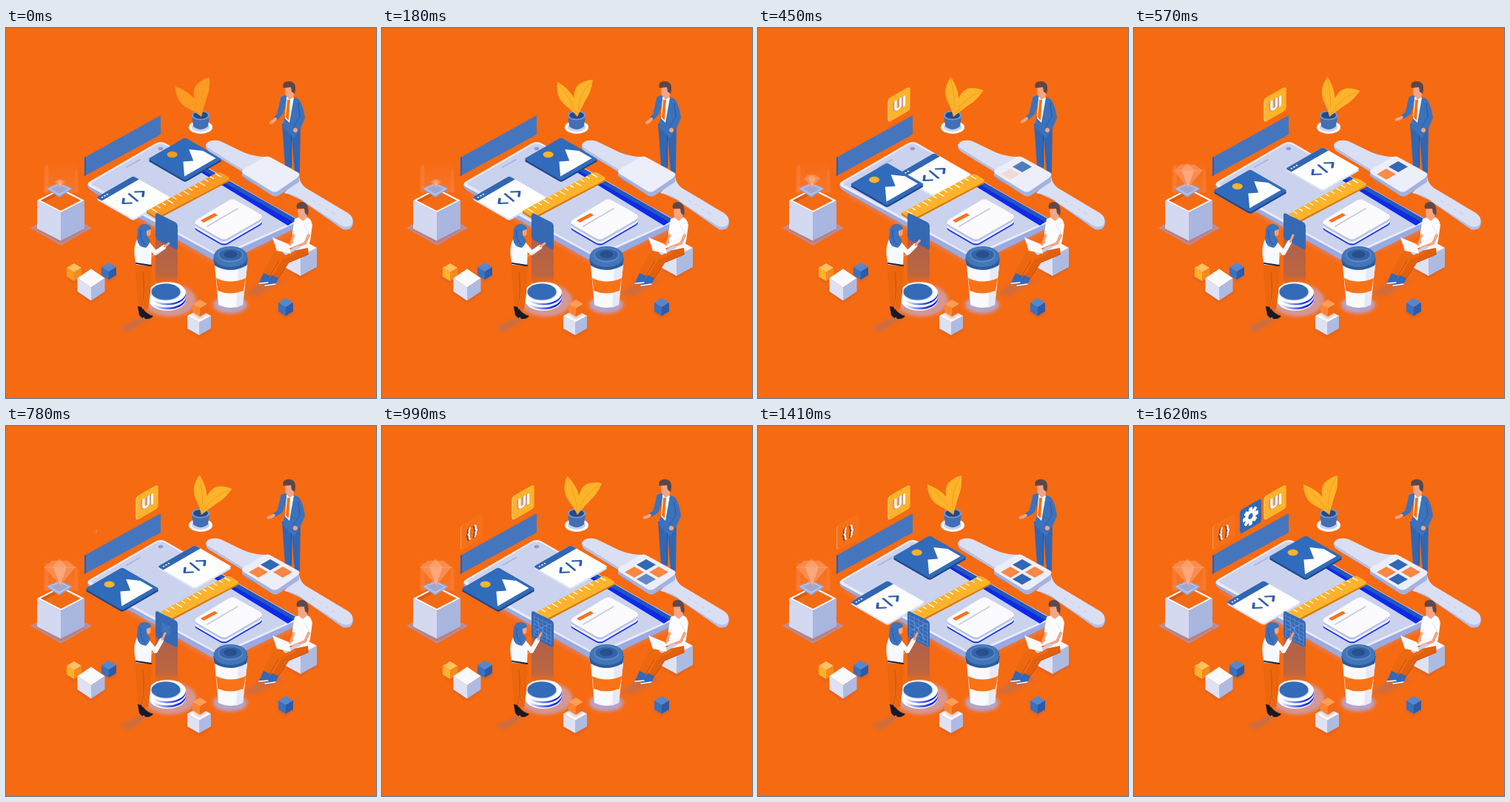
An HTML page that plays this animation: 500x500 px, repeating every 1830 ms.

```html
<!DOCTYPE html>
<html lang="en">
<head>
<meta charset="utf-8">
<title>Isometric design workspace</title>
<style>
html, body { margin: 0; height: 100%; overflow: hidden; background: #f66a12 }
svg { display: block; width: 100vw; height: 100vh }
.y { fill: var(--yellow) }
text { font-family: Roboto, sans-serif; font-weight: 900; text-anchor: middle }
</style>
</head>
<body>
<svg id="stage" viewBox="0 0 500 500"></svg>
<script>
const svg = document.getElementById('stage');
const $ = id => document.getElementById(id);

const poly = (fill, points, more = '') => `<polygon fill="${fill}" points="${points}" ${more}/>`;
const path = (fill, d, more = '') => `<path fill="${fill}" d="${d}" ${more}/>`;
const line = (stroke, width, d, more = '') =>
  `<path fill="none" stroke="${stroke}" stroke-width="${width}" stroke-linecap="round" stroke-linejoin="round" d="${d}" ${more}/>`;
const oval = (fill, cx, cy, rx, ry, more = '') =>
  `<ellipse fill="${fill}" cx="${cx}" cy="${cy}" rx="${rx}" ry="${ry}" ${more}/>`;
const group = (id, body, more = '') => `<g id="${id}" ${more}>${body}</g>`;
const repeat = (n, draw) => Array.from({ length: n }, (_, i) => draw(i)).join('');

const WHITE = ['#fbfbff', '#dfe2f3', '#adbbe2'];
const BLUE = ['#5288cf', '#3b70bb', '#2b5aa8'];
const ORANGE = ['#ff9c55', '#fb8531', '#ef6a18'];
const YELLOW = ['#ffc062', 'var(--yellow)', '#f48a1d'];
const SKIN = '#f3a585';
const FLOOR = 'matrix(.866 -.5 .866 .5 0 0)';
const WALL = 'matrix(.866 -.5 0 1 0 0)';
const BLUR = 'filter="url(#blur)"';

// x, y is the middle of the top face; w, d its half diagonals
function cube(x, y, w, d, h, [top, left, right]) {
  return poly('#b2593c', [x - w - 2, y + h, x, y + h - d, x + w + 2, y + h, x, y + h + d + 3], 'opacity=".45" ' + BLUR) +
    poly(top, [x - w, y, x, y - d, x + w, y, x, y + d]) +
    `<polygon style="fill:${left}" points="${[x - w, y, x, y + d, x, y + d + h, x - w, y + h]}"/>` +
    poly(right, [x + w, y, x, y + d, x, y + d + h, x + w, y + h]);
}

function floorCard(id, face, edge, art) {
  const rect = fill => `<rect x="-29" y="-29" width="58" height="58" rx="3" fill="${fill}"/>`;
  return group(id, `<g transform="translate(0 2.5)"><g transform="${FLOOR}">${rect(edge)}</g></g>
    <g transform="${FLOOR}">${rect(face)}${art}</g>`);
}

function wallIcon(id, face, edge, art) {
  const rect = (x, fill) => `<rect x="${x}" y="-16" width="33.500" height="32" rx="4" style="fill:${fill}"/>`;
  return group(id, `<g transform="${WALL}">${rect(-18, edge)}${rect(-16.5, face)}${art}</g>`);
}

const label = (s, size, shade) =>
  `<text x="-1.500" y="6.500" font-size="${size}" fill="${shade}">${s}</text><text x="1" y="6.500" font-size="${size}" fill="#fff">${s}</text>`;

const gear = repeat(8, i => `<rect x="-2.7" y="-12" width="5.4" height="8" rx="1" transform="rotate(${i * 45})" fill="#fff"/>`) +
  '<circle r="6.2" fill="none" stroke="#fff" stroke-width="5"/>';

const board = poly('#4576bd', '106,175 209,118 209,144 106,200') +
  poly('#315ea9', '106,175 108,174 108,199 106,200');

const leaf = (d, vein) => path('', d, 'class="y"') + line('#f99a1c', .8, vein);
const plant = oval('#fff', 263, 134, 16, 9) + oval('#c9d2ec', 263, 134, 12, 6) +
  path('#426fb5', 'M251 118L253 133Q263 141 273 133L275 118Z') +
  oval('#7598cf', 263, 118, 12.5, 6.5) + oval('#274a86', 263, 118, 10, 4.8) +
  group('leaves',
    leaf('M264 120Q262 91 229 79Q229 99 245 108Q257 114 264 120Z', 'M263 118Q252 98 231 82') +
    leaf('M264 120Q247 88 258 76Q266 69 275 67Q276 84 271 95Q267 108 264 120Z', 'M264 116Q259 92 273 70'));

const phone = path('#d98674', 'M112 222L285 321L395 274L300 240Z', 'opacity=".6" ' + BLUR) +
  path('#9aabe3', 'M110 211Q110 217 116 220L279 313Q290 320 302 314L390 271Q396 267 395 258L212 160Z') +
  path('#e9ecf9', 'M114 207L202 156Q209 152 216 156L390 257Q395 261 390 264L298 306Q288 310 280 305L114 215Q107 211 114 207Z') +
  path('#cbd2ed', 'M117 208L203 158Q209 155 215 158L388 258Q392 261 387 263L297 303Q288 307 281 303L118 213Q113 211 117 208Z') +
  poly('#0b2be6', '247,185 255,180 393,259 381,267') +
  poly('#2456bd', '249,183 255,180 393,259 388,262') +
  line('#aab5dd', 2, 'M163 188L181 178') + oval('#8e9cce', 209, 163, 3.3, 2.2);

const codeCard = floorCard('code', '#fff', '#dbe0f2',
  '<path fill="#3166b2" d="M-29 -20V-26Q-29 -29 -26 -29H26Q29 -29 29 -26V-20Z"/>' +
  repeat(3, i => `<circle cx="${-24 + i * 4}" cy="-24.5" r="1.2" fill="#fff"/>`) +
  line('#2d5ca9', 2.8, 'M-9 -6L-16 0L-9 6M9 -6L16 0L9 6M1.5 -8L-1.5 8'));
const imageCard = floorCard('image', '#316bbb', '#1e478c',
  '<circle class="y" cx="-4" cy="-16" r="5.8"/>' +
  poly('#fff', '-24,23 -5,2 4,9 16,-10 25,3 25,23'));

const ruler = group('ruler',
  poly('#d9780e', '190,247 190,250 204,259 302,207 302,204 204,256') +
  path('', 'M190 247L284 196Q288 194 292 196L300 201Q304 203 300 206L204 256Z', 'class="y"') +
  repeat(13, i => {
    const n = i % 3 ? 4 : 7;
    return line('#fff', 1.3, `M${197 + i * 7.2} ${244.5 - i * 3.95}l${n} ${n * .57}`);
  }));

const slab = 'M258 259L301 233Q306 230 311 233L343 251Q349 255 343 259L300 284Q295 287 289 284L258 266Q253 263 258 259Z';
const note = [['#1533ea', 8], ['#f2f4fd', 6], ['#b9c3e7', 3], ['#fbfbff', 0]]
  .map(([fill, dy]) => path(fill, slab, `transform="translate(0 ${dy})"`)).join('') +
  poly('#f9711c', '263,260 282,250 286,253 267,263') +
  line('#c3c9e4', 1.5, 'M272 268L313 244');

const tile = (id, x, y, fill) => group(id, poly(fill, [x - 13, y, x, y - 7.5, x + 13, y, x, y + 7.5]));
const watch = path('#b4c0e6', 'M270 157Q269 164 276 168L322 196L345 181L287 154Z') +
  path('#dadff3', 'M273 154Q280 150 290 153L321 168Q336 174 352 174L321 192L276 164Q267 159 273 154Z') +
  path('#b4c0e6', 'M376 222L398 232L455 272Q469 275 469 261L398 212Z') +
  path('#dadff3', 'M396 201Q398 211 405 216L462 250Q472 257 467 266Q461 271 453 267L406 237Q393 225 376 223Z') +
  repeat(4, i => line('#c0c9e8', 1, `M${414 + i * 9} ${233 + i * 5.4}l3 2`)) +
  path('#a4b2df', 'M319 194V200L359 226Q364 229 369 226L396 208V199Z') +
  path('#eceffa', 'M321 191L348 175Q353 172 358 175L394 195Q399 198 394 202L368 220Q363 223 358 220L321 197Q317 194 321 191Z') +
  line('#8997cc', 1.5, 'M324 204l10 6') +
  tile('tileTop', 357, 187.5, '#3267b6') + tile('tileLeft', 341, 197.5, '#fb8542') +
  tile('tileRight', 374, 197.5, '#fb8542') + tile('tileBottom', 357, 207, '#3267b6');

const standingMan =
  path('#3366b1', 'M373 129L398 130L397 196L390 194L386 150L385 189L377 186Z') +
  line('#264f94', 1, 'M385.500 136V188') +
  path('#3c72bb', 'M373 92L381 91L391 94Q400 95 404 121Q401 130 396 139L389 149L374 133L378 114Z') +
  poly('#fff', '379,93 389,94 383,128 377,122') + poly('#f97312', '380,97 384,97 382,125 378,121') +
  line('#3c72bb', 8, 'M375 96L371 113') + group('manArm', line('#3c72bb', 6, 'M371 115L366 121') + line(SKIN, 4, 'M364 123L361 126L358 128')) +
  line('#2b579f', 1, 'M395 102L397 120L389 133') + oval(SKIN, 391, 138, 3, 3) +
  path(SKIN, 'M377 80L389 79L389 93L383 97L377 89Z') +
  path('#5b4649', 'M375 81Q372 72 383 72Q394 73 390 89L386 86L385 80Z');

const leftBox = poly('#b495b2', '33,270 74,248 116,270 74,294', 'opacity=".85"') +
  cube(74, 233, 32, 16.5, 38, ['#f5f6fd', '#d3d9f0', '#a8b6e0']) +
  poly('#f36b12', '47,233 74,219 101,233 74,247') + poly('#d95a16', '47,233 74,219 74,223 52,235') +
  '<rect x="51" y="178" width="47" height="44" fill="url(#beam)"/>' +
  line('#fb8c50', 5, 'M55 187V221', 'opacity=".35"') + line('#fb8c50', 3, 'M95 192V222', 'opacity=".3"') +
  poly('#8fa2d6', '54,217 72,209 90,217 72,229') + poly('#b4c0e5', '56,217 72,210 88,217 72,227') +
  poly('#9fa8d3', '60,217 72,212 84,217 72,224') +
  group('gem', poly('#fb8f58', '52,191 62,182 83,182 94,191 73,216') + poly('#fca878', '62,191 72,180 83,191') +
    poly('#fdb28c', '64,191 82,191 73,216') + line('#fcb28a', .8, 'M52 191H94'), 'opacity=".85"');

const disc = oval('#cba3b8', 221, 368, 36, 22, BLUR + ' opacity=".8"') +
  [['#fff', 367.5], ['url(#ring)', 366], ['#fff', 363], ['url(#ring)', 360], ['#fff', 357.5]]
    .map(([fill, y]) => oval(fill, 218, y, 25, 14.5)).join('') +
  oval('#d8def3', 216, 357, 21, 12) + oval('#336bb8', 216, 356.5, 19.5, 11);

const screen = '<rect x="202" y="284" width="30" height="62" fill="url(#shade)"/>' +
  path('#3569b4', 'M202 253Q202 249 206 251L228 262Q232 264 232 268V296Q232 300 228 298L206 287Q202 285 202 281Z') +
  group('mesh', repeat(5, i => line('#6f9ad8', .6, `M${205 + i * 6} ${254 + i * 3}v30`)) +
    repeat(6, i => line('#6f9ad8', .6, `M204 ${256 + i * 5.4}l26 13`)) +
    line('#84abe2', .6, 'M206 277L227 267M208 262L226 289'));

const woman = poly('#b8705a', '152,406 184,390 194,392 165,411', 'opacity=".7" ' + BLUR) +
  path('#ec660d', 'M175 318L196 320Q198 345 192 380L186 380L185 350L184 378L179 377Q175 345 175 318Z') +
  line('#ce520d', 1, 'M185 330Q188 350 184 376') +
  path('#151a2b', 'M178 376L183 377L189 389L184 392L180 388Z') + path('#151a2b', 'M185 379Q190 387 199 389Q196 394 188 393L185 388Z') +
  path('#f8f9ff', 'M178 284Q170 297 176 320L196 321L197 298L191 286Z') + line('#1c2240', 2, 'M176 318L196 321') +
  group('womanArm', '') +
  path(SKIN, 'M188 268L196 271L195 280L189 282Z') +
  path('#3d73bb', 'M178 273Q180 264 189 265Q197 267 196 272L190 274Q189 281 194 285Q196 291 189 297Q178 296 177 285Z') +
  line('#28569f', 1, 'M182 273Q180 285 188 293');

const cup = oval('#b8a3c7', 303, 374, 23, 12, BLUR) +
  path('#f9f9fe', 'M282 320L287 374Q303 382 320 374L326 320Z') + path('#e6e9f5', 'M314 325L311 378L320 374L326 320Z') +
  path('#f97316', 'M284 338Q303 347 324 338L321 355Q303 362 286 355Z') +
  path('#2d5b9d', 'M280 311L282 321Q303 333 325 321L327 311Z') +
  oval('#4376b8', 303.5, 309, 23, 14) + oval('#5f8bc4', 303.5, 307, 17, 9.5) +
  oval('#3465a8', 303.5, 306.5, 15.5, 8) + oval('#274f8c', 303.5, 306, 9, 5);

const sittingMan = poly('#b8705a', '323,361 352,334 376,342 340,362', 'opacity=".6" ' + BLUR) +
  cube(398, 297, 22, 12, 26, WHITE) +
  path('#e2600c', 'M408 297L384 302Q377 304 374 311L359 337L366 341L382 317L409 306Z') +
  path('#ec680f', 'M392 295L367 302Q360 304 357 311L347 333L355 337L369 315L392 306Z') +
  line('#c9500f', 1, 'M355 337L369 315M366 341L382 317L408 306') +
  path('#3568b5', 'M348 331L357 335L355 342Q349 347 342 344Z') + path('#3568b5', 'M359 334L368 338L365 345Q357 350 350 347Z') +
  line('#fff', 1.3, 'M342 345L354 344M350 348L364 346') +
  path('#fdfdff', 'M390 258L401 254Q412 255 414 266L411 288L408 297L388 294L387 276Z') +
  line('#d8ddef', 1, 'M403 266L409 276L406 292') +
  line(SKIN, 4, 'M409 280L404 291L389 297') + line(SKIN, 3, 'M389 280L384 293') +
  poly('#c9d1eb', '374,304 395,294 398,297 378,307') + poly('#f8f9ff', '360,283 382,292 385,305 366,301') +
  path(SKIN, 'M394 245L406 244L407 256L401 261L395 256Z') +
  path('#5e4a4d', 'M393 244Q391 235 401 235Q411 238 408 254L404 250L403 244Z');

const gradient = (id, attrs, stops) => `<linearGradient id="${id}" ${attrs}>` +
  stops.map(([at, color, alpha = 1]) => `<stop offset="${at}" stop-color="${color}" stop-opacity="${alpha}"/>`).join('') + '</linearGradient>';

svg.innerHTML = `<defs>
  <filter id="blur" x="-40%" y="-40%" width="180%" height="180%"><feGaussianBlur stdDeviation="2"/></filter>` +
  gradient('beam', 'x2="0" y2="1"', [[0, '#fb8c50', 0], [1, '#fb8c50', .35]]) +
  gradient('shade', 'x2="0" y2="1"', [[0, '#b0614c'], [.8, '#bb663f'], [1, '#bb663f', 0]]) +
  gradient('ring', '', [[.1, '#fff'], [.55, '#5068ee'], [.8, '#122de6']]) +
  '</defs><rect width="500" height="500" fill="#f66a12"/>' +
  board +
  wallIcon('braces', '#f57118', '#fb9450', label('{ }', 18, '#7d4230')) +
  wallIcon('gear', '#3268b5', '#5b8bcd', gear) +
  wallIcon('ui', 'var(--yellow)', '#ffcb6c', label('UI', 20, '#c99a86')) +
  plant + phone + codeCard + imageCard + ruler + note + standingMan + watch + leftBox +
  cube(92, 324, 10, 6, 12, YELLOW) + cube(139, 323, 10, 6, 11, BLUE) + cube(115, 338, 18.5, 12.5, 18, WHITE) +
  disc + screen + woman + cup + sittingMan +
  cube(261, 389, 16, 9, 17, WHITE) + cube(262, 373, 10, 6, 11, ORANGE) +
  cube(378, 371, 10, 6, 12, BLUE);

const clamp = x => Math.max(0, Math.min(1, x));
const span = (t, a, b) => clamp((t - a) / (b - a));
const sine = x => (1 - Math.cos(Math.PI * x)) / 2;
const cubic = x => x < .5 ? 4 * x ** 3 : 1 - 4 * (1 - x) ** 3;
const easeOut = x => 1 - (1 - x) ** 2;
const mix = (a, b, p) => a + (b - a) * p;

const move = (id, transform) => $(id).setAttribute('transform', transform);
const place = (id, from, to, p) => move(id, `translate(${mix(from[0], to[0], p)} ${mix(from[1], to[1], p)})`);
const grow = (id, x, y, s) => move(id, `translate(${x} ${y}) scale(${s})`);
const growAbout = (id, x, y, s) => move(id, `translate(${x} ${y}) scale(${s}) translate(${-x} ${-y})`);
const fade = (id, p) => $(id).setAttribute('opacity', p);

function render(t) {
  svg.style.setProperty('--yellow', t < 60 ? '#fd9a22' : '#fdb32a');

  const sway = sine(span(t, 0, 500)) - sine(span(t, 800, 1300));
  move('leaves', `rotate(${38 * sway} 264 120)`);

  const out = cubic(span(t, 230, 580)), back = cubic(span(t, 980, 1340));
  if (t < 900) {
    place('image', [242, 177], [157, 220], out);
    place('code', [172, 229], [255, 190], out);
  } else {
    place('image', [157, 220], [232, 177], back);
    place('code', [255, 190], [175, 238], back);
  }
  const reach = sine(span(t, 380, 560));
  place('ruler', [0, 0], [12, 8], reach);

  grow('ui', 191, 103, easeOut(span(t, 180, 420)));
  grow('braces', 121.5, 143, easeOut(span(t, 765, 1000)));
  grow('gear', 157.5, 122, easeOut(span(t, 1410, 1620)));
  growAbout('gem', 73, 216, mix(.32, 1, sine(span(t, 350, 630))));

  fade('tileTop', span(t, 280, 480));
  fade('tileLeft', span(t, 420, 580));
  fade('tileRight', span(t, 600, 780));
  fade('tileBottom', span(t, 840, 1040));

  const x = mix(220, 215, reach), y = mix(291, 280, reach);
  const wristX = mix(203, x, .6), wristY = mix(304, y, .6);
  $('womanArm').innerHTML = line('#fff', 6, `M192 292L202 304L${wristX} ${wristY}`) +
    line('#d5daee', .8, `M196 309L${wristX} ${wristY + 3}`) + line(SKIN, 3, `M${wristX + 1} ${wristY - 1}L${x} ${y}`);
  move('manArm', `rotate(${16 * reach} 371 114)`);

  const mesh = span(t, 600, 1020);
  growAbout('mesh', 216, 274, mesh);
  fade('mesh', clamp(mesh * 2));
}

function tick() {
  const t = performance.now() % 1830;
  render(t < 60 ? 0 : Math.min(1620, Math.floor(t / 30) * 30));
  requestAnimationFrame(tick);
}
tick();
</script>
</body>
</html>
```
